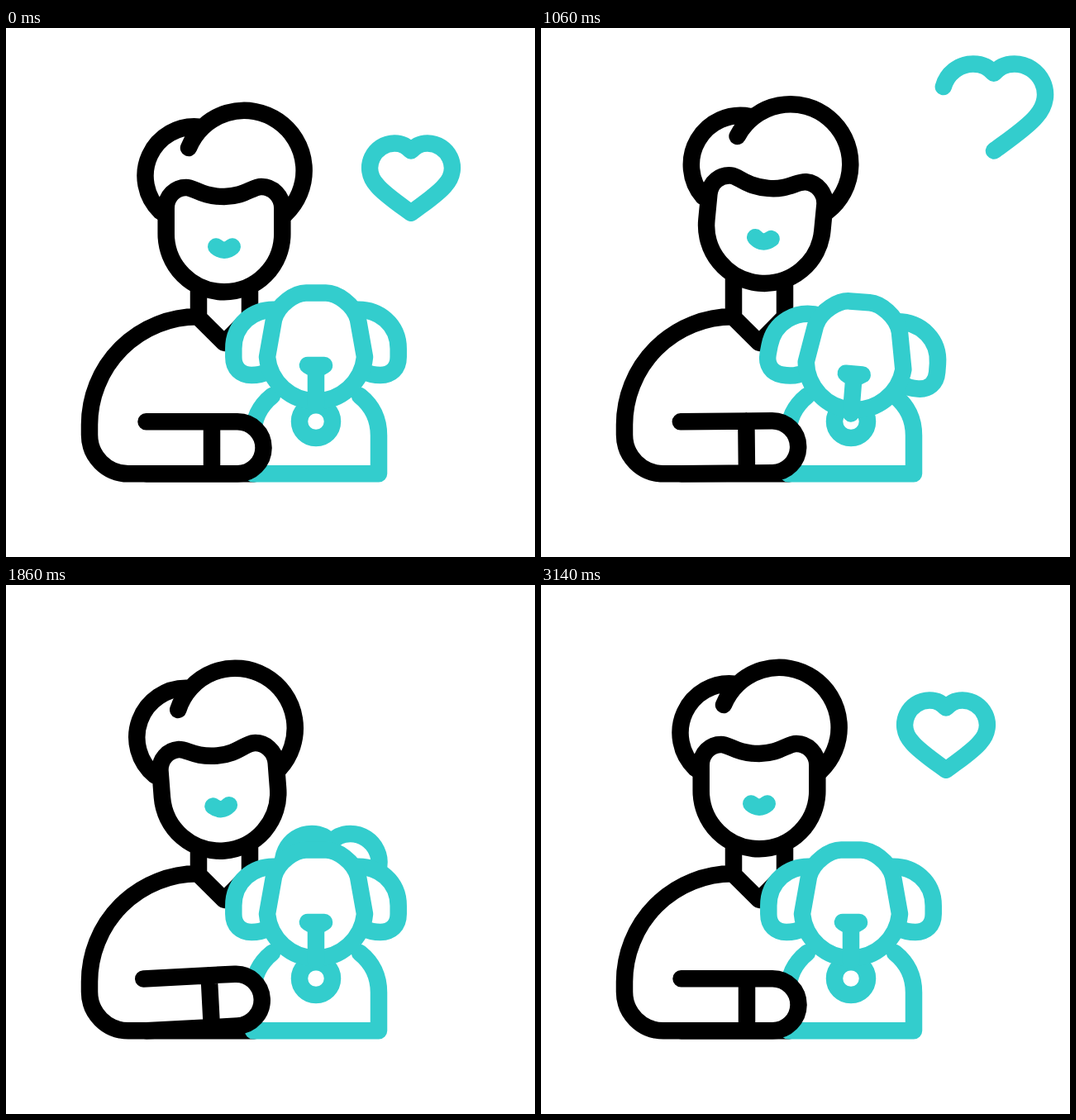
An HTML page that plays this animation: 640 px wide and 640 px high, repeating every 3600 ms.

```html
<!DOCTYPE html>
<html lang="en">
<head>
<meta charset="utf-8">
<title>Owner and dog</title>
<style>
  html, body { margin: 0; height: 100%; overflow: hidden; background: #fff; }
  svg { display: block; width: 100%; height: 100%; }
  svg * { stroke-linecap: round; stroke-linejoin: round; }
  .ink { stroke: #000; }
  .teal { stroke: #33cdcd; }
  .line { fill: none; }
</style>
</head>
<body>
<svg viewBox="0 0 640 640" fill="#fff" stroke-width="20.5">
  <!-- torso, collar and neck -->
  <path class="ink line" d="M300 539.3H148A47 47 0 0 1 101 492V480A131 131 0 0 1 232 349.3L264 381L295 349.3H316M233 349V300M295 349V300"/>
  <g id="head" class="ink">
    <path class="line" d="M234 119.7A59.5 59.5 0 0 0 187 222M221 145A72.5 72.5 0 1 1 338 225"/>
    <path d="M193.7 249V218C193.7 203 205 193 218 193C228 193 236 204 264 204C288 204 298 192 309 192C323 192 334.3 204 334.3 218V249A70.3 70.3 0 0 1 193.7 249Z"/>
    <path class="teal line" d="M254.3 264.5Q264 273 273.7 264.5"/>
  </g>
  <path id="heart" class="teal line" pathLength="1" d="M0 42.3C-14 32-33 19-41 9C-61-13-44-42-20-42C-10-42-5-38 0-33C5-38 10-42 20-42C44-42 61-13 41 9C33 19 14 32 0 42.3"/>
  <g class="teal">
    <path d="M322 445C307 457 299 472 299 493V539.3H451V493C451 472 443 457 428 445"/>
    <circle cx="375" cy="476" r="20"/>
    <g id="dog">
      <g id="earL"><path id="ear" d="M330 341C298 338 275.3 360 275.3 388V398C275.3 412 284 420 297 420C303 420 310 419 316 416"/></g>
      <g id="earR"><use href="#ear" transform="matrix(-1 0 0 1 750 0)"/></g>
      <path d="M363 320.5C350 320.5 329 334 324 353L316 398A59.3 59.3 0 0 0 434 398L426 353C421 334 400 320.5 387 320.5Z"/>
      <path class="line" d="M365 408H385L375 414ZM375 414V456"/>
    </g>
  </g>
  <g id="arm" class="ink">
    <path d="M169.5 476.3H280A31.5 31.5 0 0 1 280 539.3H170" stroke="none"/>
    <path class="line" d="M169.5 476.3H280A31.5 31.5 0 0 1 280 539.3H170M249 476.3V539.3"/>
  </g>
</svg>
<script>
const LOOP = 3600, STROKE = 20.5, BEAT = 740, RESET = 1640, SETTLE = 3120;
const $ = id => document.getElementById(id);
const smooth = u => (1 - Math.cos(Math.PI * Math.min(1, u))) / 2;
const mix = (a, b, p) => a + (b - a) * p;

// Sways from rest through evenly timed poses and back to rest.
const sway = (step, ...poses) => t => {
  const i = Math.floor(t / step);
  return mix(poses[i - 1] ?? 0, poses[i] ?? 0, smooth(t / step - i));
};

const armTurn = sway(500, -16.6, 0, -16.6);
const headDrop = sway(500, 13.5, -11.5, 12.5);
const headTurn = sway(560, -4, 5.8, -6.5, 2.6);
const dogTurn = sway(BEAT / 2, -10, -2.5, 4.8, -1.6);
const dogDrop = sway(BEAT / 2, 15, -2, 11, 1);
const earLeft = sway(BEAT / 2, -3, -8.5, 7, -5);
const earRight = sway(BEAT / 2, 0, -6, 0, -3.5);

const turn = (id, angle, x, y, drop = 0) =>
  $(id).setAttribute("transform", `translate(0 ${drop}) rotate(${angle} ${x} ${y})`);

// The heart floats off and is wiped away, then a new one rises from behind the dog.
function drawHeart(t) {
  const rising = t >= RESET;
  const away = rising
    ? 1 - Math.sin(Math.PI / 2 * Math.min(1, (t - RESET) / (SETTLE - RESET)))
    : smooth(t / RESET);
  const [farX, farY] = rising ? [364, 401] : [570, 63];
  const beats = (rising ? Math.min(t, SETTLE) - SETTLE : t) / BEAT;
  const size = 1 + 0.26 * Math.sin(Math.PI * beats) ** 2;
  const wiped = rising ? 0 : Math.min(1, Math.max(0, (t - 842) / 758));
  const set = (name, value) => $("heart").setAttribute(name, value);
  set("transform", `translate(${mix(490, farX, away)} ${mix(181.5, farY, away)}) scale(${size})`);
  set("stroke-width", STROKE / size);
  set("stroke-dasharray", wiped ? `${1 - wiped} 2` : "none");
  set("stroke-dashoffset", -wiped);
  set("visibility", wiped < 1 ? "visible" : "hidden");
}

const start = performance.now();
function draw() {
  const t = (performance.now() - start) % LOOP;
  turn("head", headTurn(t), 264, 315, headDrop(t));
  turn("arm", armTurn(t), 170, 539.3);
  turn("dog", dogTurn(t), 375, 456, dogDrop(t));
  turn("earL", earLeft(t), 330, 341);
  turn("earR", earRight(t), 420, 341);
  drawHeart(t);
  requestAnimationFrame(draw);
}
draw();
</script>
</body>
</html>
```
